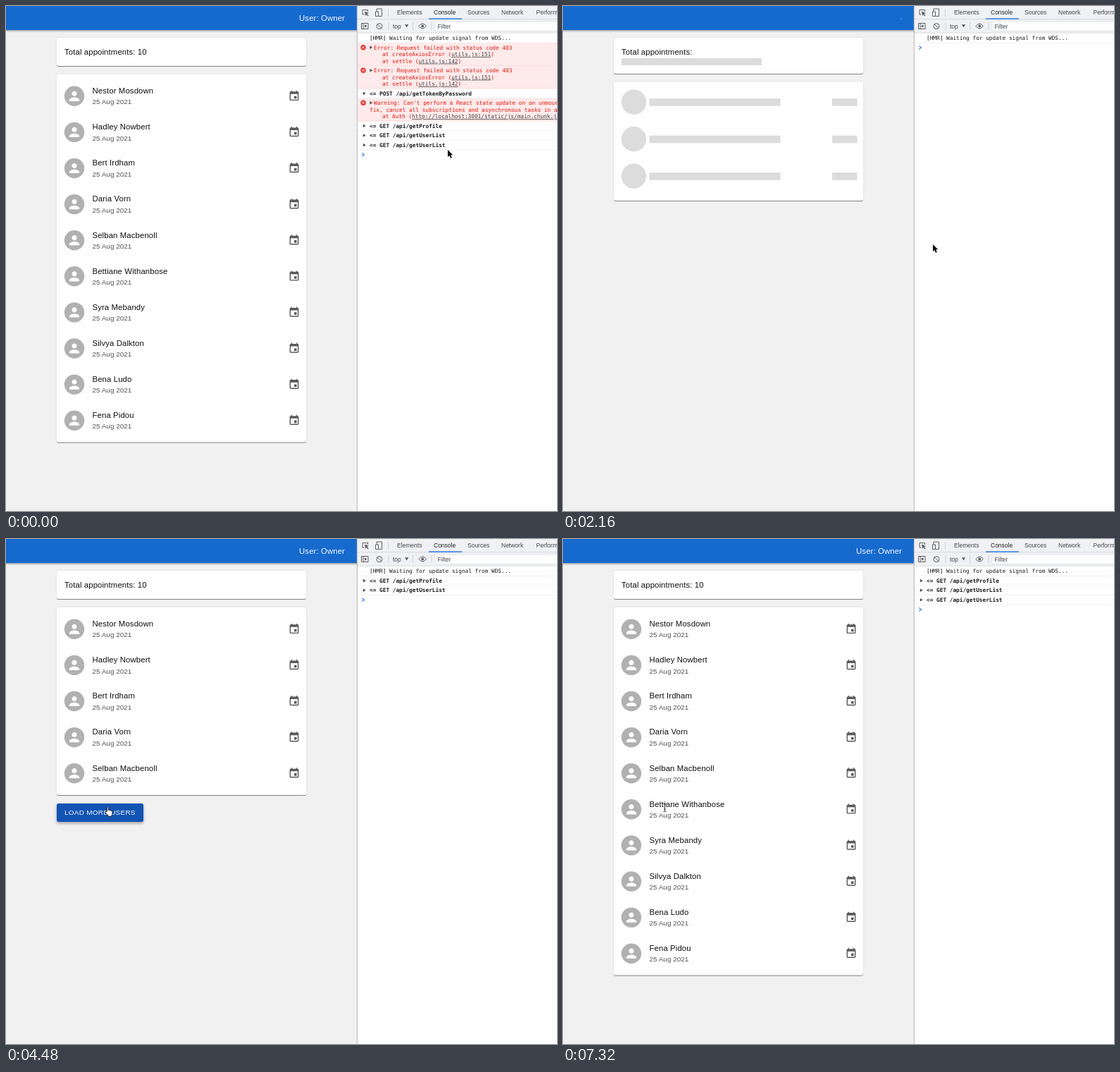
An HTML page that plays this animation: 782x716 px, repeating every 7.4 s.

```html
<!DOCTYPE html>
<html lang="en">
<head>
<meta charset="utf-8">
<title>Appointments</title>
<style>
  html, body { margin: 0; width: 100%; height: 100%; overflow: hidden; background: #f1f1f2; }
  svg { display: block; }
  text { font-family: "Liberation Sans", Arial, sans-serif; white-space: pre; }
  .body { font-size: 11.36px; letter-spacing: .107px; fill: #111; }
  .date { font-size: 9.94px; fill: #525252; }
  .label { font-size: 9.94px; letter-spacing: .284px; }
  .tool { font-size: 8.5px; fill: #44474b; }
  .mono { font-family: "DejaVu Sans Mono", monospace; font-size: 7.78px; fill: #1c1c1c; }
  .bold { font-weight: bold; fill: #1c1c1c; }
  .error { fill: #e0160f; }
  .link { fill: #444; text-decoration: underline; }
  .card { fill: #fefefe; filter: drop-shadow(0 1px .5px rgba(0,0,0,.42)) drop-shadow(0 .4px 1px rgba(0,0,0,.1)); }
  .bar { fill: #166acd; filter: drop-shadow(0 1.5px 1.7px rgba(0,0,0,.42)); }
</style>
</head>
<body>
<svg id="stage" width="782" height="716" viewBox="0 0 782 716"></svg>
<script>
const LOOP = 7400;
const AT = {
  clear: 840, reload: 1920, wave: 2440, profile: 2960, users: 3960,
  hover: 4160, click: 4560, more: 5520, beam: 5560
};
const NAMES = ["Nestor Mosdown", "Hadley Nowbert", "Bert Irdham", "Daria Vorn", "Selban Macbenoll",
  "Bettiane Withanbose", "Syra Mebandy", "Silvya Dalkton", "Bena Ludo", "Fena Pidou"];
const PERSON = "M12 12c2.21 0 4-1.79 4-4s-1.79-4-4-4-4 1.79-4 4 1.79 4 4 4zm0 2c-2.67 0-8 1.34-8 4v2h16v-2c0-2.66-5.33-4-8-4z";
const EVENT = "M17 12h-5v5h5v-5zM16 1v2H8V1H6v2H5c-1.11 0-2 .9-2 2v14c0 1.1.89 2 2 2h14c1.1 0 2-.9 2-2V5c0-1.1-.9-2-2-2h-1V1h-2zm3 18H5V8h14v11z";

const text = (x, y, cls, str, extra = "") => `<text x="${x}" y="${y}" class="${cls}" ${extra}>${str}</text>`;
const rect = (x, y, w, h, attrs) => `<rect x="${x}" y="${y}" width="${w}" height="${h}" ${attrs}/>`;
const icon = (d, cx, cy, scale, fill) =>
  `<path d="${d}" fill="${fill}" transform="translate(${cx} ${cy}) scale(${scale}) translate(-12 -12)"/>`;
const vline = (x, y1, y2) => `<path d="M${x} ${y1}V${y2}" stroke="#c9cbcf" stroke-width=".8"/>`;
const hline = (y, color) => `<path d="M499 ${y}H782" stroke="${color}" stroke-width=".7"/>`;

function userRow(name, i) {
  const y = 127.8 + 51.1 * i;
  return `<circle cx="97" cy="${y}" r="14.2" fill="#b1b1b1"/>` + icon(PERSON, 97, y, .888, "#fefefe")
    + text(122.5, y - 3.7, "body", name) + text(122.5, y + 11.6, "date", "25 Aug 2021")
    + icon(EVENT, 409, y - .1, .71, "#5a5a5a");
}

// Every placeholder is painted twice: flat grey, then the moving shade.
function skeleton() {
  const shapes = fill => {
    const f = `fill="${fill}"`;
    let out = rect(83, 74, 199, 10.3, f);
    for (let i = 0; i < 3; i++) {
      const y = 136.2 + 52.5 * i;
      out += `<circle cx="100.5" cy="${y}" r="17.7" ${f}/>`
        + rect(122.5, y - 5, 186, 10.6, f) + rect(382, y - 5, 35.5, 10.6, f);
    }
    return out;
  };
  return shapes("#dcdcdd") + shapes("url(#shade)");
}

function toolbar() {
  const tabs = [[555, "Elements"], [607, "Console"], [655, "Sources"], [703, "Network"], [752.5, "Performance"]];
  const line = 'fill="none" stroke="#5b5e63" stroke-width="1"';
  return rect(498, 0, 284, 716, 'fill="#fefefe"') + rect(498, 0, 284, 38, 'fill="#f0f1f4"')
    + hline(18.7, "#cdd0d4") + hline(38.2, "#cdd0d4")
    + rect(600, 17.4, 47, 1.5, 'fill="#2b78e4"')
    + tabs.map(([x, s]) => text(x, 12.3, "tool", s, s === "Console" ? 'style="fill:#222"' : "")).join("")
    + `<path d="M508.500 12H506V5.500H513.500V8" ${line}/><path d="M509 7.500l6 2.500-2.600 1 2.300 2.600-1 .9-2.300-2.600-1.200 2.300z" fill="#5b5e63"/>`
    + `<path d="M526 8V4h7.500v10.500H529M524.500 8h4v6.500h-4z" ${line}/>`
    + vline(542.5, 4, 15)
    + `<path d="M504.500 24.500h9.500v8h-9.500zM507 24.500v8" ${line}/><path d="M509 26.300l3.300 2.200-3.300 2.200z" fill="#5b5e63"/>`
    + `<circle cx="530" cy="28.700" r="4" ${line}/><path d="M527.200 25.900l5.600 5.600" ${line}/>`
    + vline(543, 23, 34) + text(549, 31.6, "tool", "top")
    + '<path d="M566 26.200h5.200l-2.600 4.300z" fill="#5b5e63"/>' + vline(577.5, 23, 34)
    + `<path d="M586 28.500q5.200-7 10.400 0q-5.200 7-10.400 0z" ${line}/><circle cx="591.200" cy="28.500" r="1.900" fill="#5b5e63"/>`
    + vline(604, 23, 34) + rect(609, 22, 180, 13.5, 'fill="#fefefe" stroke="#d6d8db" stroke-width=".6"')
    + text(612.5, 31.8, "tool", "Filter")
    + '<path d="M498.300 0V716" stroke="#b4b4b6"/>';
}

const triangle = (x, y) => `<path d="M${x} ${y - 2.3}l3.800 2.300-3.800 2.300z" fill="#4c4c4c"/>`;
const link = s => `<tspan class="link">${s}</tspan>`;

// Console entries are {lines, height, error, plain}; each line is [x, markup].
const log = s => ({ lines: [[516, s]], height: 13.6, plain: true });
const call = s => ({ lines: [[516, "&lt;= " + s]], height: 13.6 });
const fault = (...lines) => ({ lines, height: 32.4, error: true });
const HMR = log("[HMR] Waiting for update signal from WDS...");
const PROFILE = call("GET /api/getProfile");
const USERS = call("GET /api/getUserList");
const REJECTED = fault([522, "Error: Request failed with status code 403"],
  [534, `at createAxiosError (${link("utils.js:151")})`], [534, `at settle (${link("utils.js:142")})`]);
const UNMOUNTED = fault([522, "Warning: Can't perform a React state update on an unmounted component."],
  [516, "fix, cancel all subscriptions and asynchronous tasks in a useEffect"],
  [534, `at Auth (${link("http://localhost:3001/static/js/main.chunk.js")}:90:5)`]);

function consoleRows(entries) {
  let y = 38.6, out = "";
  for (const e of entries) {
    if (e.error) {
      out += rect(499, y, 283, e.height, 'fill="#fdeaea"')
        + `<circle cx="507" cy="${y + 6.6}" r="3.700" fill="#df3a37"/>`
        + `<path d="M505.500 ${y + 5.1}l3 3m0-3l-3 3" stroke="#fff" stroke-width=".9"/>` + triangle(516.4, y + 6.6);
    } else if (!e.plain) out += triangle(506.8, y + 6.9);
    const cls = "mono " + (e.error ? "error" : e.plain ? "" : "bold");
    e.lines.forEach(([x, s], i) => { out += text(x, y + 9.6 + 9.4 * i, cls, s); });
    y += e.height;
    out += hline(y, e.error ? "#f7cfcf" : "#ececee");
  }
  return out + `<path d="M505.300 ${y + 4.6}l3.200 2.300-3.200 2.300" fill="none" stroke="#3c7de6" stroke-width="1.200"/>`;
}

function entriesAt(t) {
  if (t < AT.clear) return [HMR, REJECTED, REJECTED, call("POST /api/getTokenByPassword"), UNMOUNTED, PROFILE, USERS, USERS];
  if (t < AT.reload) return [];
  const seen = [HMR];
  if (t >= AT.profile) seen.push(PROFILE);
  if (t >= AT.users) seen.push(USERS);
  if (t >= AT.more) seen.push(USERS);
  return seen;
}

const stage = document.getElementById("stage");
stage.innerHTML = `
  <defs><linearGradient id="shade" x1="0" x2="1">
    <stop offset="0" stop-opacity="0"/><stop offset=".5" stop-opacity=".055"/><stop offset="1" stop-opacity="0"/>
  </linearGradient></defs>
  ${rect(0, 0, 782, 716, 'fill="#f1f1f2"')}
  ${rect(-10, -10, 520, 44.1, 'class="bar"')}
  ${text(481, 21.2, "body", "User: Owner", 'id="user" text-anchor="end" style="fill:#f4f8fd"')}
  ${rect(478.5, 17.6, 2.6, .8, 'id="dash" fill="#7fade3"')}
  ${rect(72, 45, 354, 40, 'id="total" class="card" rx="2.8"')}
  ${rect(72, 97, 354, 521, 'id="list" class="card" rx="2.8"')}
  <text x="83" y="69.200" class="body">Total appointments:<tspan id="count"> 10</tspan></text>
  <g id="bones">${skeleton()}</g>
  <g id="first">${NAMES.slice(0, 5).map(userRow).join("")}</g>
  <g id="rest">${NAMES.slice(5).map((n, i) => userRow(n, i + 5)).join("")}</g>
  <g id="button">${rect(72, 375, 123, 26, 'id="face" rx="2.8"')}${text(83, 391.3, "label", "", 'id="label"')}</g>
  ${toolbar()}
  <g id="console"></g>
  <g id="cursor" stroke-linejoin="round">
    <path id="arrow" d="M0 0v10l2.300-2.100 1.700 3.900 1.800-.8-1.700-3.800h3.100z" fill="#000" stroke="#fff" stroke-width=".8" paint-order="stroke"/>
    <path id="hand" d="M-1.100 6.500V.8q0-1 1-1t1 1V4.700q.3-.7 1.100-.6t.9.9q.5-.6 1.200-.3t.7 1q.6-.4 1.200 0t.5 1.100v2.200q0 1.500-1 2.700v1.500h-5.200v-1.400L-3.600 8q-.6-1 .1-1.500t1.300 0z" fill="#fff" stroke="#111" stroke-width=".9"/>
    <path id="beam" d="M-2-4.500q2 0 2 1.400q0-1.400 2-1.400M0-3.300V5.300M-2 6.700q2 0 2-1.400q0 1.400 2 1.400M-1.200 3h2.400" fill="none" stroke="#222" stroke-width=".9"/>
  </g>`;

const el = {};
stage.querySelectorAll("[id]").forEach(n => { el[n.id] = n; });
const show = (node, on) => node.setAttribute("display", on ? "inline" : "none");
const clamp = v => Math.min(1, Math.max(0, v));
const ease = v => v * v * (3 - 2 * v);
const mix = (a, b, k) => a + (b - a) * k;
const mixColor = (a, b, k) => `rgb(${a.map((v, i) => Math.round(mix(v, b[i], k)))})`;

// [start, end, x, y]: the pointer travels to x, y between the two times.
const MOVES = [[0, 0, 627, 204], [40, 760, 528.5, 25], [1150, 1280, 525, 338], [2560, 3120, 467, 409], [3430, 4130, 144.5, 380]];

function pointer(t) {
  let [x, y] = [627, 204];
  for (const [from, to, px, py] of MOVES) {
    if (t < from) break;
    const k = to > from ? ease(clamp((t - from) / (to - from))) : 1;
    x = mix(x, px, k);
    y = mix(y, py, k);
  }
  return [x, y];
}

function drawButton(t) {
  const off = t >= AT.click;
  const hover = ease(clamp((t - AT.hover) / 250));
  const fade = ease(clamp((t - AT.click) / 250));
  const blue = [22, 106, 205], dark = [18, 84, 180], grey = [206, 206, 207];
  const lift = mix(1.4, 2.2, hover);
  el.face.setAttribute("width", off ? 112.5 : 123);
  el.face.setAttribute("fill", off ? mixColor(dark, grey, fade) : mixColor(blue, dark, hover));
  el.face.style.filter = `drop-shadow(0 ${lift}px ${lift}px rgba(0,0,0,${.36 * (1 - fade)}))`;
  el.label.textContent = off ? "LOADING MORE..." : "LOAD MORE USERS";
  el.label.setAttribute("fill", off ? "#999" : "#f4f8fd");
}

let shownRows;
function draw(t) {
  const loading = t >= AT.reload && t < AT.users;
  const partial = t >= AT.users && t < AT.more;
  const named = t < AT.reload || t >= AT.profile;

  show(el.user, named);
  show(el.dash, !named);
  show(el.count, !loading);
  show(el.bones, loading);
  show(el.first, !loading);
  show(el.rest, !loading && !partial);
  show(el.button, partial);
  el.total.setAttribute("height", loading ? 51 : 40);
  el.list.setAttribute("y", loading ? 107.5 : 96.8);
  el.list.setAttribute("height", loading ? 168.5 : partial ? 266.2 : 521.7);

  const shift = mix(-1, 1, clamp((t - AT.wave) / 960));
  el.shade.setAttribute("x1", shift);
  el.shade.setAttribute("x2", shift + 1);
  if (partial) drawButton(t);

  const entries = entriesAt(t);
  if (entries.length !== shownRows) {
    shownRows = entries.length;
    el.console.innerHTML = consoleRows(entries);
  }

  const [x, y] = pointer(t);
  const hand = (t >= 720 && t < 1180) || (t >= 4110 && t < AT.click);
  const beam = t >= AT.beam;
  el.cursor.setAttribute("transform", `translate(${x} ${y})`);
  show(el.hand, hand);
  show(el.beam, beam);
  show(el.arrow, !hand && !beam);
}

const start = performance.now();
function tick() {
  draw((performance.now() - start) % LOOP);
  requestAnimationFrame(tick);
}
tick();
</script>
</body>
</html>
```
